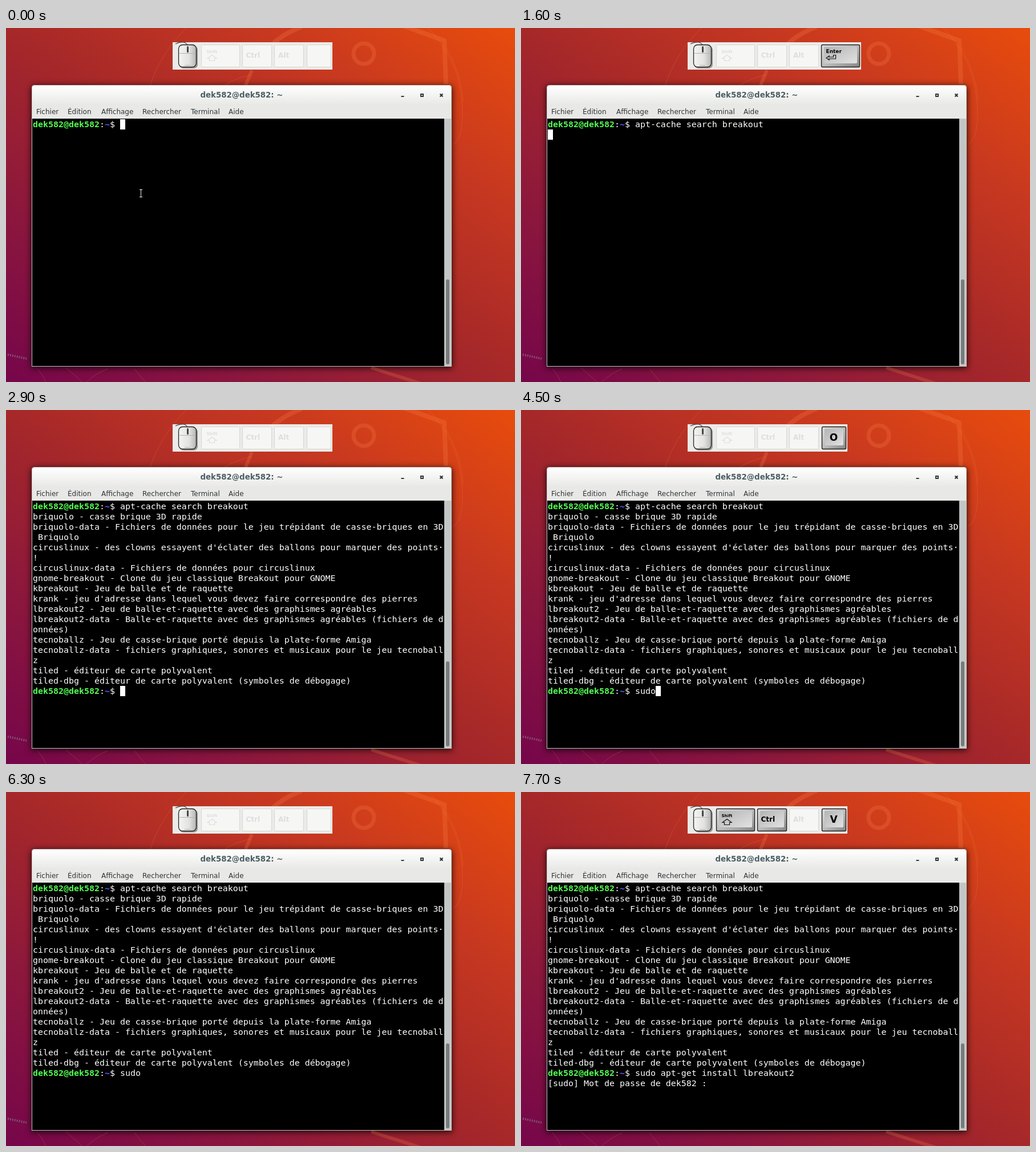
Animation of 892x621 px, one loop 8 s. Source, as an HTML page:

```html
<!DOCTYPE html>
<html lang="fr">
<head>
<meta charset="utf-8">
<title>Terminal</title>
<style>
html, body { margin: 0; width: 100%; height: 100%; overflow: hidden; }
body { background: linear-gradient(to top right, #75064a, #8c173d 25%, #a62829 50%, #c73820 75%, #e84c0c); }
svg { position: absolute; left: 0; top: 0; font-family: "DejaVu Sans", sans-serif; }
text { white-space: pre; }
#window { position: absolute; left: 45px; top: 100px; width: 736px; height: 494px; border-radius: 5px 5px 0 0;
  box-shadow: 0 2px 11px 1px rgba(0, 0, 0, .75); }
#terminal { font: 14.95px "DejaVu Sans Mono", monospace; fill: #fff; }
.user { font-weight: bold; fill: #54ff54; }
.path { font-weight: bold; fill: #5c5cff; }
.key { font-weight: bold; fill: #dedede; stroke: none; }
.key .cap { fill: #f6f6f5; stroke: #d6d8d0; }
.key .face { fill: none; }
.key .icon { fill: none; stroke: #dedede; stroke-width: 1.2; }
.key.on { fill: #000; }
.key.on .cap { fill: url(#side); stroke: #222; stroke-width: 1.4; }
.key.on .face { fill: url(#face); }
.key.on .icon { stroke: #111; }
</style>
</head>
<body>
<div id="window"></div>
<svg width="892" height="621" viewBox="0 0 892 621">
  <defs>
    <linearGradient id="title" x2="0" y2="1"><stop stop-color="#fff"/><stop offset="1" stop-color="#e8e8e6"/></linearGradient>
    <linearGradient id="side" x2="1" y2="1"><stop stop-color="#dedede"/><stop offset=".5" stop-color="#bcbcbc"/><stop offset="1" stop-color="#858585"/></linearGradient>
    <linearGradient id="face" x2="1" y2="1"><stop stop-color="#b4b4b4"/><stop offset="1" stop-color="#e2e2e2"/></linearGradient>
    <linearGradient id="body"><stop stop-color="#f4f4f2"/><stop offset=".6" stop-color="#e2e2e0"/><stop offset="1" stop-color="#b4b4b2"/></linearGradient>
  </defs>

  <g fill="none" stroke="#ff8a50" stroke-opacity=".22">
    <circle cx="627" cy="45" r="18" stroke-width="7"/>
    <path d="M468 27Q490 8 518-2M690-6L768 22L771 98" stroke-width="8"/>
    <path d="M431 74L420 100M640 596L728 624" stroke-width="6"/>
    <path d="M318-2Q272 42 252 102M738-2Q790 50 798 120T783 205M772 35Q800 85 801 130M384 100Q402 88 430 82M55 598Q66 610 70 622M105 596L135 622M140 622Q160 604 178 598M225 598L245 622"/>
  </g>
  <path d="M3 573L36 580" stroke="#8a7c92" stroke-width="4" stroke-dasharray="2 2" opacity=".6"/>

  <path d="M45 594V105Q45 100 50 100H776Q781 100 781 105V594Z" fill="#c3c6c6"/>
  <path d="M46 135V105Q46 101 50 101H776Q780 101 780 105V135Z" fill="url(#title)"/>
  <path d="M46 134H780V159H46Z" fill="#e8e8e6"/>
  <path d="M46 159H768V593H46Z"/>
  <rect x="771" y="441" width="6" height="149" rx="3" fill="#777b7c"/>
  <text x="413" y="122" text-anchor="middle" font-size="13.33" font-weight="bold" fill="#4c5f63">dek582@dek582: ~</text>
  <path d="M692.500 120H697.500M727 116H731V120H727ZM760.500 115.500L765.500 120.500M765.500 115.500L760.500 120.500" fill="none" stroke="#2c3b3e" stroke-width="2"/>
  <g font-size="12" fill="#2e3436">
    <text x="53" y="151">Fichier</text><text x="108" y="151">Édition</text><text x="167" y="151">Affichage</text>
    <text x="239" y="151">Rechercher</text><text x="324" y="151">Terminal</text><text x="390" y="151">Aide</text>
  </g>

  <g id="terminal"></g>
  <rect id="cursor" width="9" height="18" fill="#fff"/>
  <path id="pointer" d="M234 283.500H239M234 296.500H239M236.500 283V297" stroke="#eee" fill="none"/>

  <rect id="panel" x="292" y="25" height="48" fill="#ebebe9"/>
  <rect x="304" y="31" width="32" height="40" rx="7" fill="#777" opacity=".7"/>
  <path d="M297 28Q305 24 311 25T318 31" fill="none" stroke="#444" stroke-width="1.200"/>
  <rect x="302.500" y="29.500" width="31" height="39" rx="7" fill="url(#body)" stroke="#222" stroke-width="1.300"/>
  <path d="M304 44.500H333M318.500 30V44M313 65.500H323" stroke="#b2b5b0" fill="none"/>
  <rect x="317" y="32" width="3" height="11" rx="1.500" fill="#444"/>
  <g id="shift" class="key"><path class="icon"/></g>
  <g id="ctrl" class="key"></g>
  <g id="alt" class="key"></g>
  <g id="last" class="key"></g>
</svg>
<script>
const $ = id => document.getElementById(id);
const prompt = '<tspan class="user">dek582@dek582</tspan>:<tspan class="path">~</tspan>$ ';
const search = 'apt-cache search breakout';
const output = `briquolo - casse brique 3D rapide
briquolo-data - Fichiers de données pour le jeu trépidant de casse-briques en 3D
 Briquolo
circuslinux - des clowns essayent d'éclater des ballons pour marquer des points·
!
circuslinux-data - Fichiers de données pour circuslinux
gnome-breakout - Clone du jeu classique Breakout pour GNOME
kbreakout - Jeu de balle et de raquette
krank - jeu d'adresse dans lequel vous devez faire correspondre des pierres
lbreakout2 - Jeu de balle-et-raquette avec des graphismes agréables
lbreakout2-data - Balle-et-raquette avec des graphismes agréables (fichiers de d
onnées)
tecnoballz - Jeu de casse-brique porté depuis la plate-forme Amiga
tecnoballz-data - fichiers graphiques, sonores et musicaux pour le jeu tecnoball
z
tiled - éditeur de carte polyvalent
tiled-dbg - éditeur de carte polyvalent (symboles de débogage)`.split('\n');

// Timelines: [start in ms, value]
const firstInput = [[0, ''], [700, search]];
const secondInput = [[0, ''], [3800, 's'], [4000, 'su'], [4200, 'sud'], [4500, 'sudo'], [5700, 'sudo '],
  [7500, 'sudo apt-get install lbreakout2']];
const rowCount = [[0, 1], [1800, 6], [1900, 13], [2000, 19], [7500, 20]];
const modifiers = {
  shift: [[0, false], [600, true], [1600, false], [6900, true]],
  ctrl: [[0, false], [600, true], [1600, false], [7100, true]]
};
const lastKey = [[0, ''], [700, 'V'], [1200, ''], [1600, 'Enter'], [2100, ''], [3700, 'S'], [3900, 'U'],
  [4200, 'D'], [4500, 'O'], [5100, ''], [5600, 'Space'], [6300, ''], [7500, 'V']];
// Cursor cell as [column, row]; null while blinked off
const cursorCell = [[0, [17, 0]], [400, null], [700, [42, 0]], [1200, null], [1600, [0, 1]], [1800, [0, 6]],
  [1900, [0, 13]], [2000, [17, 18]], [2200, null], [2900, [17, 18]], [3500, null], [3700, [17, 18]],
  [3800, [18, 18]], [4000, [19, 18]], [4200, [20, 18]], [4500, [21, 18]], [5100, null], [5600, [21, 18]],
  [5700, [22, 18]], [6200, null], [6800, [22, 18]], [7500, [32, 19]], [7700, null]];

const valueAt = (timeline, t) => timeline.findLast(([start]) => start <= t)[1];

const keyCap = (x, width) =>
  `<rect class="cap" x="${x + .5}" y="29.500" width="${width - 1}" height="39" rx="2"/>
   <rect class="face" x="${x + 5}" y="33" width="${width - 10}" height="29" rx="2"/>`;
const label = (x, y, size, text, anchor = 'start') =>
  `<text x="${x}" y="${y}" font-size="${size}" text-anchor="${anchor}">${text}</text>`;
const icon = d => `<path class="icon" d="${d}"/>`;

$('shift').innerHTML = keyCap(342, 68) + label(351.5, 44, 7, 'Shift') +
  icon('M361 47.500L369 53.500H365.500V57.500H356.500V53.500H353Z');
$('ctrl').innerHTML = keyCap(414, 52) + label(420.5, 52, 12, 'Ctrl');
$('alt').innerHTML = keyCap(470, 52) + label(477, 52, 12, 'Alt');

function drawLastKey(name) {
  const wide = name.length > 1;
  $('panel').setAttribute('width', wide ? 304 : 280);
  $('last').classList.toggle('on', name !== '');
  $('last').innerHTML = wide
    ? keyCap(526, 68) + label(534.5, 44, 9, name) +
      (name === 'Enter' ? icon('M535 52.500L540 49V51H547.500V47.500H551.500V54H540V56Z') : '')
    : keyCap(527, 43) + label(548, 54, 17, name, 'middle');
}

let shown;
function draw() {
  const t = performance.now() % 8000;
  const rows = [prompt + valueAt(firstInput, t), ...output, prompt + valueAt(secondInput, t),
    '[sudo] Mot de passe de dek582 : '].slice(0, valueAt(rowCount, t));
  const key = valueAt(lastKey, t), cell = valueAt(cursorCell, t);
  const state = rows.join('\n') + key;
  if (state !== shown) {
    shown = state;
    $('terminal').innerHTML = rows.map((row, i) => `<text x="47" y="${174 + 18 * i}">${row}</text>`).join('');
    drawLastKey(key);
  }
  for (const id in modifiers) $(id).classList.toggle('on', valueAt(modifiers[id], t));
  $('cursor').style.display = cell ? '' : 'none';
  if (cell) $('cursor').setAttribute('transform', `translate(${47 + 9 * cell[0]} ${160 + 18 * cell[1]})`);
  $('pointer').style.display = t < 700 ? '' : 'none';
  requestAnimationFrame(draw);
}
draw();
</script>
</body>
</html>
```
